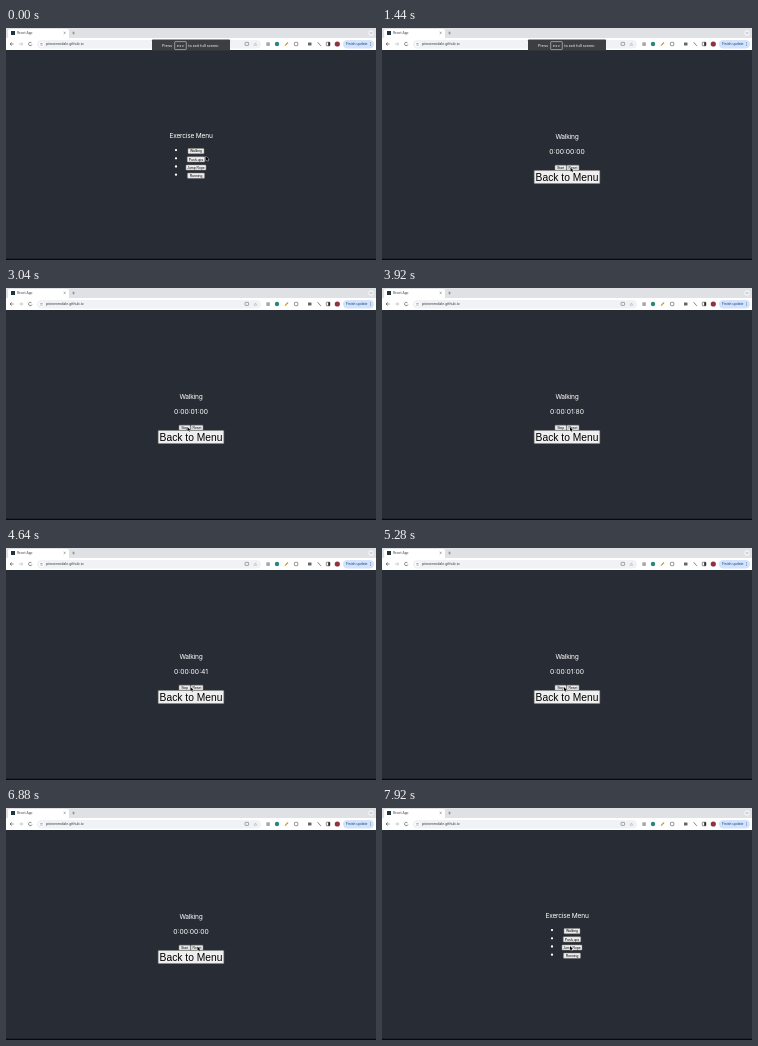
An HTML page with a canvas for the animation above (8000 ms loop, 370x232 px).

```html
<!DOCTYPE html>
<html lang="en">
<head>
<meta charset="utf-8">
<title>Exercise Menu</title>
<style>
html, body { margin: 0; width: 100%; height: 100%; overflow: hidden; background: #282c34; }
canvas { display: block; width: 370px; height: 232px; }
</style>
</head>
<body>
<canvas id="stage"></canvas>
<script>
const LOOP = 8000, STEP = 80, RATE = 0.908;
const canvas = document.getElementById('stage');
const c = canvas.getContext('2d');
const scale = window.devicePixelRatio || 1;
canvas.width = 370 * scale;
canvas.height = 232 * scale;

const UI = 'Roboto, sans-serif';
const HEADING = 'Inter, sans-serif';
const BUTTON = '"Liberation Sans", Arial, sans-serif';

// Pointer path: time, x, y
const path = [
  [0, 200, 128.5], [160, 190, 122], [1040, 190, 122], [1440, 188.5, 139.5],
  [1840, 181.5, 139], [3200, 181.5, 139], [3760, 188, 139], [4240, 188, 139],
  [4960, 182, 139], [6160, 182, 139], [6720, 191.5, 138.5], [7040, 191.5, 138.5],
  [7360, 190, 148.5], [7840, 190, 148.5], [7920, 188, 138], [8000, 188, 138]
];

function box(x, y, w, h, fill, radius = 0, stroke) {
  c.beginPath();
  c.roundRect(x, y, w, h, radius);
  if (fill) { c.fillStyle = fill; c.fill(); }
  if (stroke) { c.strokeStyle = stroke; c.lineWidth = 0.5; c.stroke(); }
}

function dot(x, y, r, fill) {
  box(x - r, y - r, 2 * r, 2 * r, fill, r);
}

function line(points, color, width = 0.7) {
  c.beginPath();
  points.forEach(([x, y]) => c.lineTo(x, y));
  c.strokeStyle = color;
  c.lineWidth = width;
  c.stroke();
}

function text(str, x, y, size, family, color, align = 'left', spacing = 0) {
  c.font = `${size}px ${family}`;
  c.letterSpacing = `${spacing}px`;
  c.textAlign = align;
  c.fillStyle = color;
  c.fillText(str, x, y);
}

function button(label, x, y, w, h, size = 3.43) {
  box(x, y, w, h, '#efefef', 0.6, '#858585');
  text(label, x + w / 2, y + h / 2 + size * 0.35, size, BUTTON, '#000', 'center');
}

function browser() {
  box(0, 0, 370, 10.5, '#dfe1e5');
  box(2, 1, 61, 11, '#fff', 2);
  box(5, 3, 4, 4, '#20343d');
  text('React App', 11, 6.4, 3.4, UI, '#45484d');
  line([[57.7, 4], [59.5, 5.8]], '#555', 0.5);
  line([[59.5, 4], [57.7, 5.8]], '#555', 0.5);
  line([[66, 5], [69, 5]], '#666', 0.5);
  line([[67.5, 3.5], [67.5, 6.5]], '#666', 0.5);
  dot(365, 5, 2.8, '#f0f2f5');
  line([[364, 4.5], [365, 5.5], [366, 4.5]], '#444', 0.5);

  box(0, 10, 370, 12, '#fff');
  line([[7.5, 16], [4, 16]], '#555');
  line([[5.6, 14.4], [4, 16], [5.6, 17.6]], '#555');
  line([[13.2, 16], [16.7, 16]], '#b5b7ba');
  line([[15.1, 14.4], [16.7, 16], [15.1, 17.6]], '#b5b7ba');
  c.beginPath();
  c.arc(24.3, 16, 1.7, 0.3, 5.5);
  c.strokeStyle = '#555';
  c.stroke();
  box(31, 12, 224, 8.4, '#f0f2f5', 4.2);
  dot(35.5, 16.2, 2.5, '#fff');
  line([[34.3, 15.4], [36.7, 15.4]], '#555', 0.5);
  line([[34.3, 17], [36.7, 17]], '#555', 0.5);
  text('pinewrendale.github.io', 40, 17.4, 3.75, UI, '#3c4043');

  box(239, 14.4, 3.6, 3, null, 0.5, '#555');
  text('☆', 249.3, 17.8, 4.6, '"DejaVu Sans", sans-serif', '#444', 'center');
  box(260.3, 14.3, 3.6, 3.6, '#a5a8ae', 0.6);
  dot(271, 16, 2.2, '#28867b');
  line([[279, 17.7], [282, 14.5]], '#c99b2e', 1.2);
  box(288.4, 14.3, 3.4, 3.4, null, 0.7, '#333');
  box(302, 14.5, 3.5, 3, '#64676c', 0.5);
  line([[311.7, 14.3], [313.3, 16.2], [314.8, 17.8]], '#444');
  box(320.3, 14.2, 3.6, 3.6, null, 0.4, '#222');
  box(322.2, 14.2, 1.7, 3.6, '#222');
  dot(331.3, 16, 2.6, '#8d3440');

  box(337, 12, 31, 8.4, '#d3e3fd', 4.2);
  text('Finish update', 340, 17.3, 3.6, UI, '#174376');
  [14.4, 16, 17.6].forEach(y => dot(364.5, y, 0.4, '#174376'));
}

function toast(alpha) {
  if (alpha <= 0) return;
  c.globalAlpha = alpha;
  box(146, 11.5, 78, 11, '#3c3e42', 0.8);
  text('Press', 156, 19, 4, UI, '#f0f0f0');
  box(168.7, 13.6, 11.6, 8, null, 0.7, '#f0f0f0');
  text('esc', 174.5, 18.9, 4, UI, '#f0f0f0', 'center', 0.4);
  text('to exit full screen', 182.2, 19, 4, UI, '#f0f0f0');
  c.globalAlpha = 1;
}

function menu() {
  text('Exercise Menu', 185, 109.7, 6.6, HEADING, '#fff', 'center', -0.2);
  [['Walking', 16], ['Push-ups', 17.5], ['Jump Rope', 20], ['Running', 17]].forEach(([label, w], i) => {
    const y = 120.5 + i * 8.2;
    dot(170, y + 1.6, 1.15, '#fff');
    button(label, 190 - w / 2, y, w, 5.2);
  });
}

function elapsed(t) {
  if (t < 1937 || t >= 6880) return 0;
  return (Math.min(t, 6000) - (t < 4178 ? 1937 : 4178)) * RATE;
}

function stopwatch(t) {
  const pad = n => String(Math.floor(n)).padStart(2, '0');
  const ms = elapsed(t);
  text('Walking', 185, 111.2, 6.6, HEADING, '#fff', 'center', -0.2);
  text(`0:00:${pad(ms / 1000)}:${pad(ms % 1000 / 10)}`, 185, 126.2, 6.76, HEADING, '#fff', 'center');
  const running = t >= 1920 && t < 6000;
  button(running ? 'Stop' : 'Start', 173, 137.2, 11.3, 4.9);
  button('Reset', 184.9, 137.2, 12.1, 4.9);
  button('Back to Menu', 152.2, 142.5, 65.6, 13, 10.28);
}

function pointer(t) {
  const i = path.findIndex(p => p[0] > t);
  const [t0, x0, y0] = path[i - 1], [t1, x1, y1] = path[i];
  const k = (t - t0) / (t1 - t0), e = k * k * (3 - 2 * k);
  c.save();
  c.translate(x0 + (x1 - x0) * e, y0 + (y1 - y0) * e);
  c.beginPath();
  [[0, 0], [0, 4], [1, 3.2], [1.7, 4.7], [2.3, 4.4], [1.7, 3], [2.9, 2.9]].forEach(p => c.lineTo(...p));
  c.closePath();
  c.strokeStyle = '#fff';
  c.lineWidth = 0.6;
  c.stroke();
  c.fillStyle = '#000';
  c.fill();
  c.restore();
}

function draw() {
  const t = Math.floor(performance.now() % LOOP / STEP) * STEP;
  c.setTransform(scale, 0, 0, scale, 0, 0);
  box(0, 0, 370, 232, '#282c34');
  box(0, 230.7, 370, 1.3, '#08090b');
  browser();
  toast(Math.min(1, (2640 - t) / 480));
  if (t >= 640 && t < 7440) stopwatch(t);
  else menu();
  pointer(t);
  requestAnimationFrame(draw);
}
draw();
</script>
</body>
</html>
```
